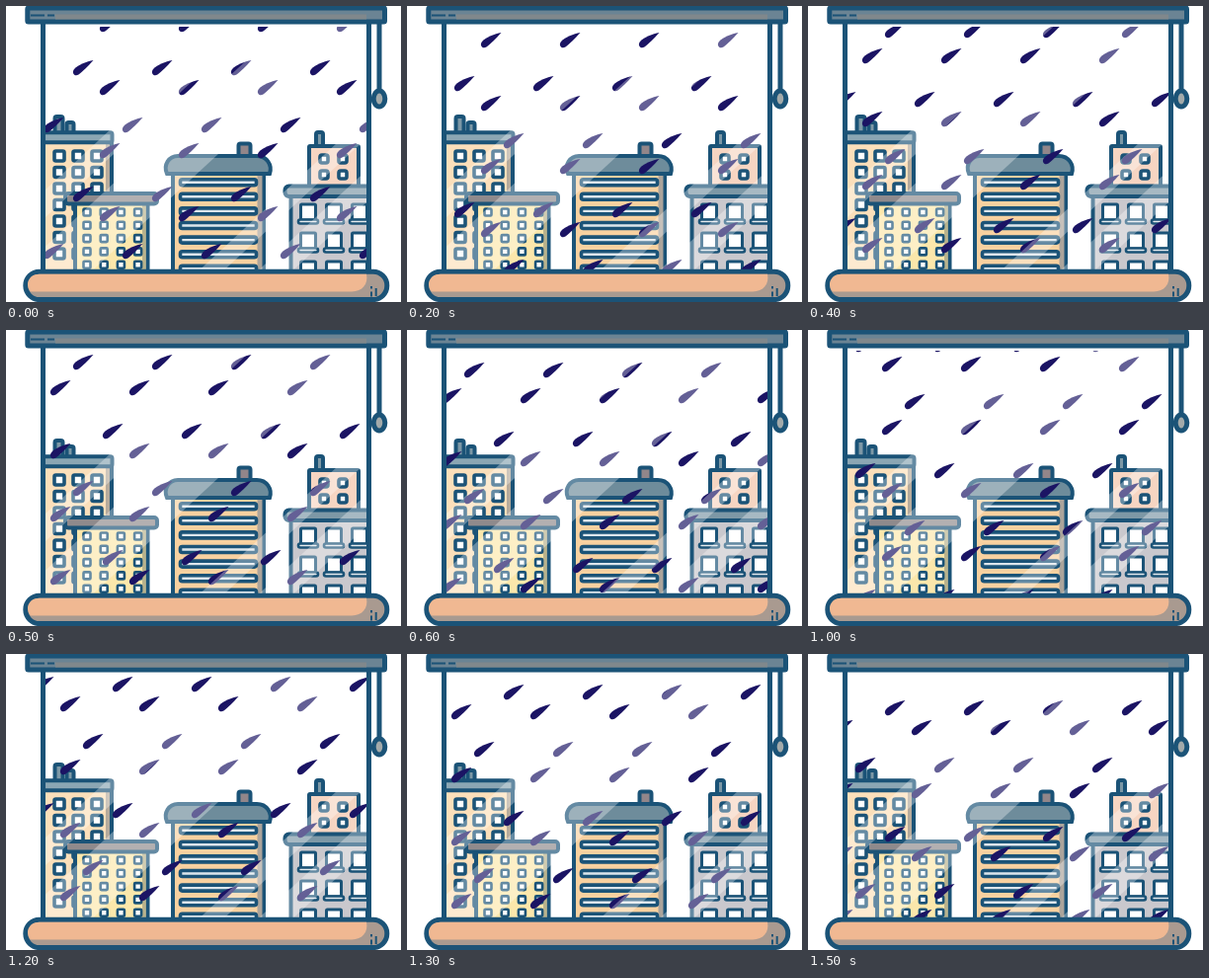
An HTML page with a canvas for the animation above (1.6 s loop, 400x300 px).

```html
<!DOCTYPE html>
<html lang="en">
<head>
<meta charset="utf-8">
<title>Rain at the window</title>
<style>
html, body { margin: 0; width: 400px; height: 300px; overflow: hidden; background: #fff; }
canvas { display: block; }
</style>
</head>
<body>
<canvas id="stage" width="400" height="300"></canvas>
<script>
const ctx = document.getElementById('stage').getContext('2d');
const INK = '#1b5377', STEEL = '#7d98a6', RAIN = '#1b1464';
const STEP = 100, STEPS = 16;
const GAP_X = 80, GAP_Y = 128;

function rect(x, y, w, h, fill) {
  ctx.fillStyle = fill;
  ctx.fillRect(x, y, w, h);
}

function box(x, y, w, h, r, fill, line = 4) {
  ctx.beginPath();
  ctx.roundRect(x, y, w, h, r);
  paint(fill, line);
}

function paint(fill, line) {
  ctx.fillStyle = fill;
  ctx.fill();
  ctx.strokeStyle = INK;
  ctx.lineWidth = line;
  ctx.stroke();
}

function grid(xs, ys, draw) {
  for (const y of ys) for (const x of xs) draw(x, y);
}

const series = (start, gap, count) => Array.from({ length: count }, (_, i) => start + i * gap);

function tallBlock() {
  box(49.5, 112, 8, 18, 2, STEEL);
  box(61.5, 118, 7, 12, 2, STEEL);
  box(34, 137, 73, 140, 0, '#fbdfba');
  rect(101, 139, 4, 128, '#b5aa9c');
  grid([54, 73, 92], series(152, 16.5, 7), (x, y) => box(x - 5, y - 5, 10, 10, 1.5, '#fff', 3.6));
  box(34, 128.3, 73.5, 10, 2, '#8ba6b3');
}

function yellowBlock() {
  box(70, 199, 73.5, 80, 0, '#fbe7ab');
  rect(138, 201, 3.5, 66, '#b9b38d');
  grid(series(82, 17.2, 4), series(209, 13.3, 5), (x, y) => box(x - 3.5, y - 3.5, 7, 7, 1, '#fff', 2.6));
  box(60, 190, 93, 10.5, 3, '#8f8a8c');
}

function slattedBlock() {
  box(235.5, 139.5, 12, 16, 2, '#92868a');
  box(169, 168, 92, 110, 0, '#f8d1a0');
  rect(254.5, 170, 5, 97, '#aba49b');
  for (const y of series(178.7, 14.6, 7)) box(176.5, y - 3, 77, 6, 2, '#dde6ec', 3.6);
  ctx.beginPath();
  ctx.moveTo(163, 170);
  ctx.bezierCurveTo(159, 161, 165, 152, 174, 152);
  ctx.lineTo(254, 152);
  ctx.bezierCurveTo(264, 152, 270, 161, 267, 170);
  ctx.closePath();
  paint('#6e8c9b', 4);
}

function rightBlock() {
  box(314, 128, 7, 17, 2, STEEL);
  box(307, 142, 50, 44, 1, '#f6d5c2');
  grid([322, 341], [155, 171], (x, y) => box(x - 4, y - 4, 8, 8, 2, '#fff', 3.6));
  box(288.5, 190, 90, 90, 0, '#c9c8cd');
  grid([306, 332, 358], [201, 230, 259], (x, y) => {
    box(x - 7.5, y, 15, 16, 1, '#fff', 3);
    box(x - 10, y + 15.5, 20, 4, 2, '#e4eaee', 2.6);
  });
  box(282.5, 182.5, 95, 10.5, 4, STEEL);
}

function drop(x, y) {
  ctx.save();
  ctx.translate(x, y);
  ctx.beginPath();
  ctx.moveTo(11, -8);
  ctx.bezierCurveTo(4, -6.8, -4, -3.5, -8.5, 1);
  ctx.bezierCurveTo(-11.5, 5, -8, 9, -4, 6.5);
  ctx.bezierCurveTo(0, 3.5, 6, -2.5, 11, -8);
  ctx.fillStyle = RAIN;
  ctx.fill();
  ctx.restore();
}

function rain(step) {
  for (const [x, y] of [[77.5, 63], [104.5, 83], [127.5, 121], [104.5, 147]]) {
    const left = (x - 10 * step + 2 * GAP_X) % GAP_X - GAP_X;
    const top = (y + 8 * step) % GAP_Y - GAP_Y;
    grid(series(left, GAP_X, 7), series(top, GAP_Y, 4), drop);
  }
}

// Slanted reflections, each given by its extent along the top edge
function glare() {
  const slant = 1.08 * 300;
  ctx.fillStyle = 'rgba(255,255,255,.32)';
  for (const [from, to] of [[241, 271], [303, 377], [485, 510], [545, 580]]) {
    ctx.beginPath();
    ctx.moveTo(from, 0);
    ctx.lineTo(to, 0);
    ctx.lineTo(to - slant, 300);
    ctx.lineTo(from - slant, 300);
    ctx.fill();
  }
}

function windowFrame() {
  rect(35, 16, 5, 254, INK);
  rect(365, 16, 5, 254, INK);

  rect(375.5, 16, 5, 70, INK);
  ctx.beginPath();
  ctx.ellipse(378, 94, 5.8, 8, 0, 0, 7);
  paint('#a3aaaa', 5);

  box(21.8, 2, 361.7, 14, 1, '#6b8494', 5);
  rect(50, 8.5, 315, 5, '#80888c');
  rect(25, 8.5, 14, 2, INK);
  rect(42, 8.5, 7, 2, INK);

  box(19.8, 269.2, 366, 28.4, 14, '#a99a90', 5);
  ctx.beginPath();
  ctx.moveTo(34, 271.7);
  ctx.lineTo(365, 271.7);
  ctx.bezierCurveTo(367, 282, 361, 289, 350, 289.5);
  ctx.lineTo(25, 289.5);
  ctx.bezierCurveTo(19, 283, 22, 271.7, 34, 271.7);
  ctx.fillStyle = '#f0b892';
  ctx.fill();
  rect(369, 284, 2, 2.5, INK);
  rect(369, 289.5, 2, 5, INK);
  rect(373.7, 286, 2, 8, INK);
}

function draw() {
  const step = Math.floor(performance.now() / STEP) % STEPS;
  rect(0, 0, 400, 300, '#fff');
  ctx.save();
  ctx.beginPath();
  ctx.rect(40, 21, 326, 247);
  ctx.clip();
  tallBlock();
  yellowBlock();
  slattedBlock();
  rightBlock();
  rain(step);
  glare();
  ctx.restore();
  windowFrame();
  requestAnimationFrame(draw);
}
draw();
</script>
</body>
</html>
```
